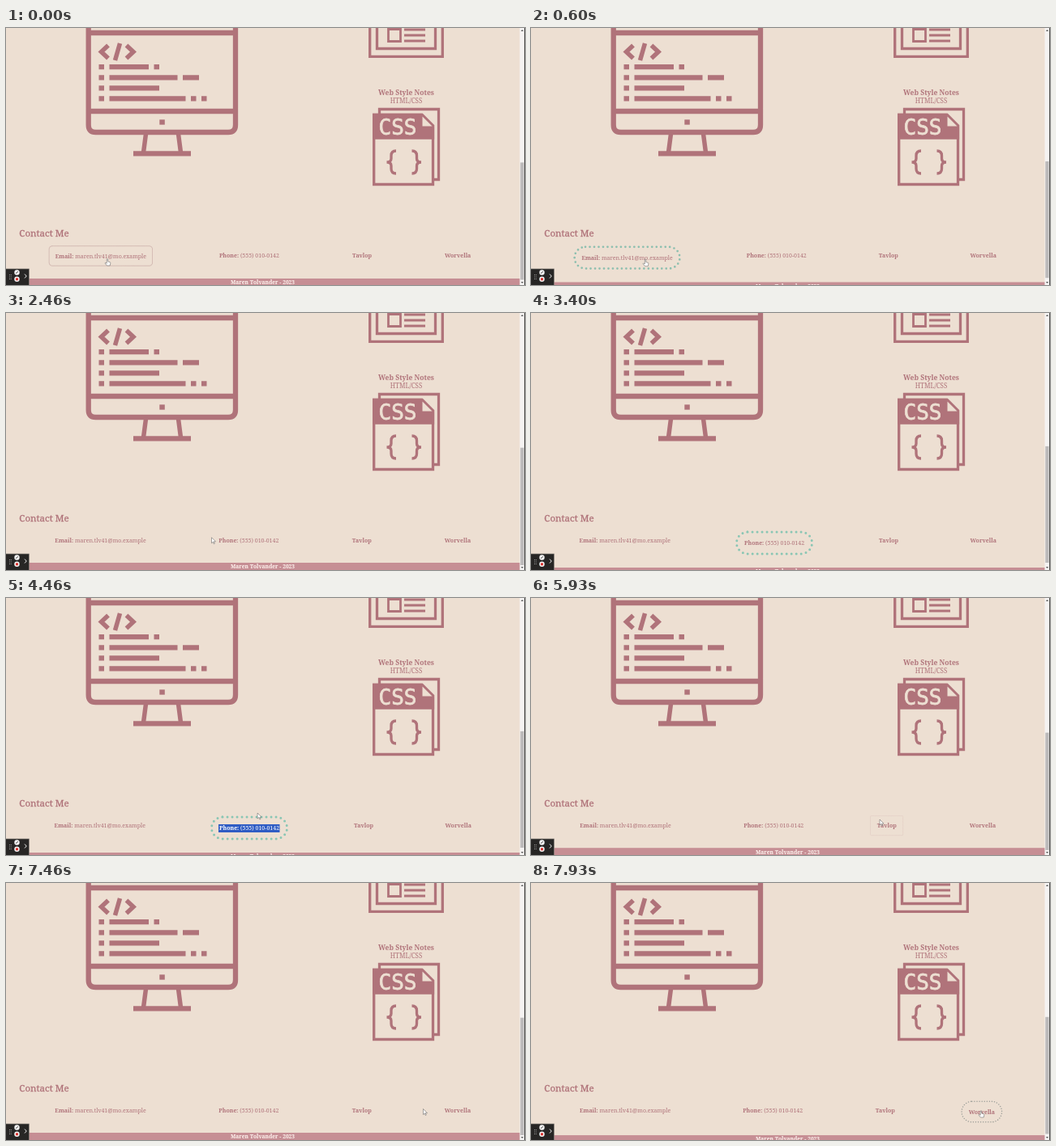
An HTML page that plays this animation: 640 by 318 pixels, repeating every 8 s.

```html
<!DOCTYPE html>
<html lang="en">
<head>
<meta charset="utf-8">
<title>Contact links</title>
<style>
  html, body { margin: 0; width: 100%; height: 100%; overflow: hidden; background: #eddfd2; }
  svg { display: block; width: 100vw; height: 100vh; }
  text { font-family: "Noto Serif", "Liberation Serif", serif; fill: #b0737a; text-anchor: middle; }
  .link { font-size: 7px; }
  .b { font-weight: 700; }
  .line { fill: none; stroke: #b0737a; }
  .solid { fill: #b0737a; }
</style>
</head>
<body>
<svg viewBox="0 0 640 318" preserveAspectRatio="none">
  <rect width="640" height="318" fill="#eddfd2"/>

  <!-- monitor -->
  <g class="line" stroke-width="6.3">
    <path d="M101.7-5V120q0 9 9 9H274q9 0 9-9V-5M102 6H283M102 103H283"/>
    <path d="M157 155.3H228"/>
    <path d="M172.500 131L169.500 154M212.500 131L215.500 154" stroke-width="5.500"/>
    <path d="M126 21.500L117.500 29.500L126 37.500M140.500 19L134.500 40M148.500 21.500L157 29.500L148.500 37.500" stroke-width="5.500"/>
    <path d="M114.500 48.200h6.500m6.500 0H176m6.500 0h6.500
      M114.500 61.300h6.500m6.500 0h84m6.500 0H238
      M114.500 74.300h6.500m6.500 0H189
      M114.500 87.300h6.500m6.500 0h94m6.500 0h6.500m6.500 0h6.500"/>
    <path d="M189.300 116.500h6.500"/>
  </g>

  <!-- newspaper -->
  <g class="line" stroke-width="3.300">
    <path d="M448.700-5V35.300H538.300V-5M457.500-5V25.500H529.500V-5" />
    <path d="M471.500 1.500h15v15h-15zM491 2H517M491 9H517M491 16H517" stroke-width="2.800"/>
  </g>

  <!-- style sheet -->
  <text class="b" x="493.500" y="83" font-size="8.500">Web Style Notes</text>
  <text x="493.500" y="93" font-size="8">HTML/CSS</text>
  <g class="line" stroke-width="3.300">
    <path d="M460.500 107V100.500H533.500V187.500H527"/>
    <path d="M453.700 107.500H513L526.500 121V193.500H453.700z" fill="#eddfd2"/>
    <path d="M453.700 107.500H513L526.500 121V136H453.700z" class="solid"/>
    <path d="M513.500 109.500V121.500H525.500z" fill="#eddfd2" stroke="none"/>
    <path d="M481 152q-6 0-6 6v3.500q0 4.500-5.500 4.500q5.500 0 5.500 4.500v3.500q0 6 6 6
      M500.500 152q6 0 6 6v3.500q0 4.500 5.500 4.500q-5.500 0-5.500 4.500v3.500q0 6-6 6"/>
  </g>
  <text x="483" y="131.500" font-size="26" style="font-family:'DejaVu Sans Mono',monospace;fill:#eddfd2;stroke:#eddfd2;stroke-width:.8">CSS</text>

  <text x="47" y="258" font-size="11.500" stroke="#b0737a" stroke-width=".3">Contact Me</text>

  <rect id="select" x="262" y="280" width="75.500" height="10" fill="#2f5cc4"/>
  <g id="links"></g>
  <rect id="ring" fill="none" stroke-linecap="round"/>

  <g id="footer">
    <rect y="309" width="634" height="20" fill="#c68e94"/>
    <text class="b" x="316.500" y="316.300" font-size="6.700" style="fill:#fff5f0">Maren Tolvander - 2023</text>
  </g>

  <!-- scrollbar -->
  <rect x="633.500" width="6" height="318" fill="#f5f3f2"/>
  <rect id="thumb" x="634.300" width="4.200" fill="#bcbaba"/>
  <path d="M635 4l1.500-2l1.500 2zM635 314l1.500 2l1.500-2z" fill="#555"/>
  <rect x="639.200" width=".8" height="318" fill="#333"/>

  <!-- recorder panel -->
  <rect x="-1" y="298" width="29.500" height="21" fill="#272625" stroke="#8d8780" stroke-width=".7"/>
  <path d="M4.500 305v6M6.300 305v6" stroke="#aaa" stroke-width=".9" stroke-dasharray="1 1.500"/>
  <circle cx="13.500" cy="302.500" r="3.200" fill="#f5f5f5"/>
  <path d="M12.300 303.700l2.400-2.400" stroke="#333"/>
  <circle cx="13.500" cy="310.800" r="3.200" fill="#f5f5f5"/>
  <rect x="12" y="309.300" width="3" height="3" fill="#d8322f"/>
  <path d="M23 304.500l2.300 2.500l-2.300 2.500" fill="none" stroke="#eee"/>

  <g fill="#fff" stroke="#555" stroke-width=".5">
    <path id="arrow" d="M0 0V7l1.700-1.500l1.100 2.500l1-.5l-1.100-2.400H5z"/>
    <path id="hand" d="M-.7 0q.7-.7 1.400 0V3l2.500.7q.8.300.6 1.300L3.200 8H-.6L-3 5q.2-1 1.300-.3l1 .6z"/>
  </g>
</svg>
<script>
const $ = id => document.getElementById(id);
const LOOP = 8000, GROW = 800, FULL = 3;

// resting box of each link: left edge and width
const links = [
  { x: 53, w: 127, label: 'Email:', rest: ' maren.tlv41@mo.example' },
  { x: 254.3, w: 90, label: 'Phone:', rest: ' (555) 010-0142' },
  { x: 418.7, w: 40, label: 'Tavlop', rest: '' },
  { x: 533, w: 48, label: 'Worvella', rest: '' }
];
$('links').innerHTML = links.map(l =>
  `<text class="link"><tspan class="b">${l.label}</tspan>${l.rest}</text>`).join('');
const labels = [...$('links').children];

// link index, pointer enters, pointer leaves
const hovers = [[0, -130, 1960], [1, 2480, 4540], [2, 5900, 7300], [3, 7520, 8000]];

// time, x, y, pointer shape
const path = [
  [0, 125, 286, 'hand'], [860, 148, 287, 'hand'], [1730, 172, 278, 'arrow'],
  [1860, 175, 275, 'arrow'], [1960, 188, 271, 'arrow'], [2480, 256, 278, 'arrow'],
  [2640, 290, 285, ''], [4390, 309, 272, 'arrow'], [4460, 310, 266, 'arrow'],
  [5130, 400, 262, 'arrow'], [5460, 400, 262, 'arrow'], [5930, 430, 274, 'arrow'],
  [6200, 442, 282, 'hand'], [6730, 448, 283, 'hand'], [7240, 448, 283, 'hand'],
  [7300, 464, 281, 'arrow'], [7520, 533, 279, 'arrow'], [7680, 548, 282, 'hand'],
  [7930, 555, 282, 'hand'], [8000, 555, 282, 'hand']
];

const mix = (a, b, p) => a + (b - a) * p;
const set = (el, attrs) => { for (const k in attrs) el.setAttribute(k, attrs[k]); };

function drawPointer(t) {
  const i = path.findIndex(k => k[0] > t) - 1;
  const [t0, x0, y0, shape] = path[i], [t1, x1, y1] = path[i + 1];
  const p = (t - t0) / (t1 - t0);
  for (const id of ['arrow', 'hand']) set($(id), {
    transform: `translate(${mix(x0, x1, p)} ${mix(y0, y1, p)})`,
    visibility: id === shape ? 'visible' : 'hidden'
  });
}

function draw(t) {
  const [active, start] = hovers.find(h => t >= h[1] && t < h[2]) || [-1, t];
  const p = Math.min(1, (t - start) / GROW), b = FULL * p;
  const selected = t >= 3900 && t < 4540;

  // the growing border takes its room from the eight equal side gaps
  links.forEach((l, j) => {
    const on = j === active;
    const left = l.x - b / 4 * (2 * j + 1) + (j > active ? 2 * b : 0);
    set(labels[j], { x: left + l.w / 2 + (on ? b : 0), y: 284.3 + (on ? b : 0) });
    if (!on) return;
    const h = 24 + b;
    set($('ring'), {
      x: left + b / 2, y: 269.5 + b / 2, width: l.w + b, height: h,
      rx: Math.min(h / 2, 25 * p), 'stroke-width': b,
      'stroke-dasharray': `0 ${Math.max(.8, 2 * b)}`,
      stroke: `rgb(${mix(176, 138, p)},${mix(115, 198, p)},${mix(122, 180, p)})`
    });
  });
  set($('ring'), { visibility: b > 0 ? 'visible' : 'hidden' });

  set($('select'), { visibility: selected ? 'visible' : 'hidden' });
  labels[1].style.fill = selected ? '#fff' : '';

  set($('footer'), { transform: `translate(0 ${2 * b})` });
  set($('thumb'), { y: 166.7 - b * .6, height: 145.3 - b * .4 });
  drawPointer(t);
}

function frame(now) {
  draw(now % LOOP);
  requestAnimationFrame(frame);
}
draw(0);
requestAnimationFrame(frame);
</script>
</body>
</html>
```
